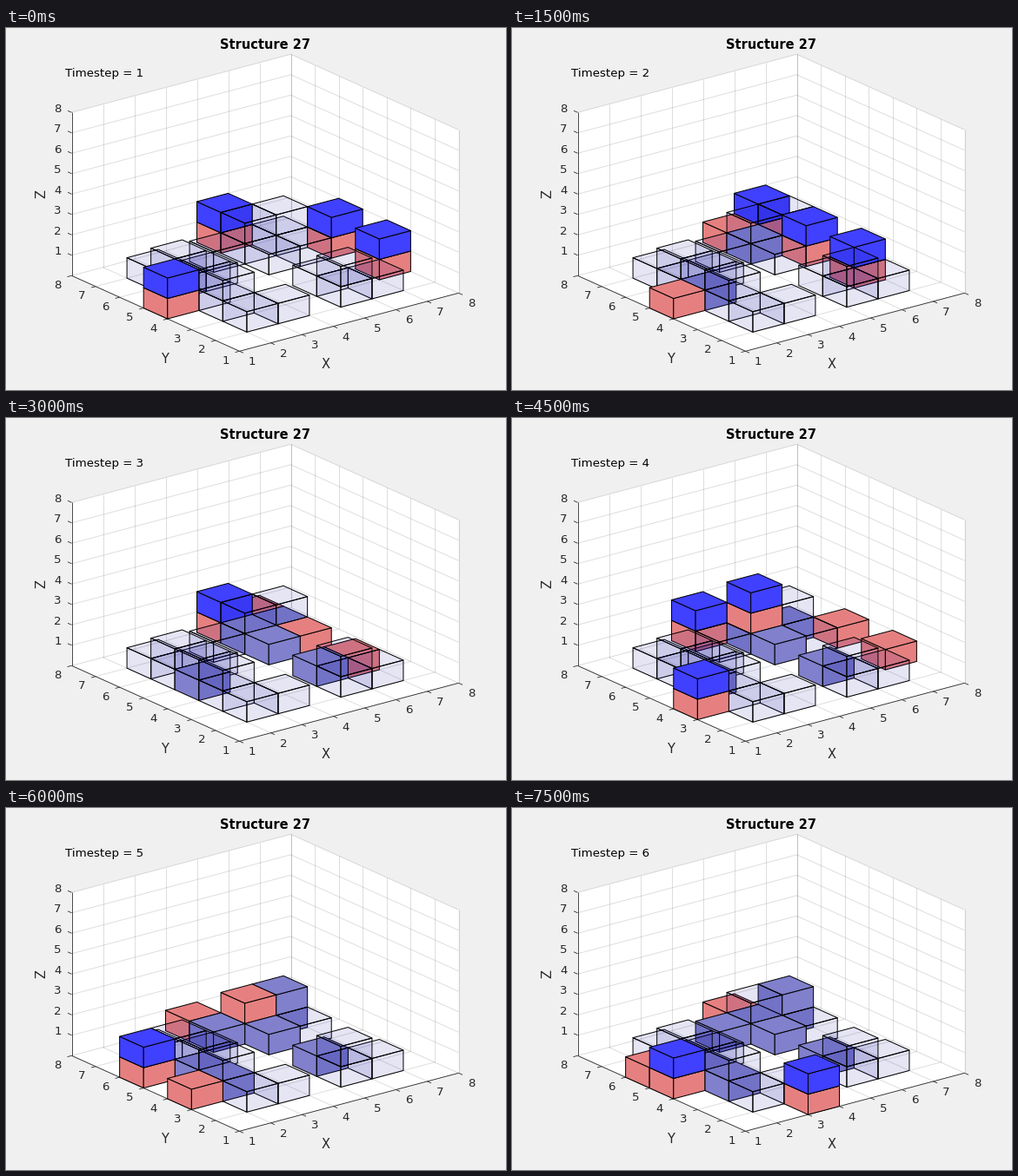
These frames come from a looping animation (575x417 px, 8000 ms). A matplotlib script:

```python
import matplotlib.pyplot as plt
from matplotlib.animation import FuncAnimation
from matplotlib.patches import Polygon

W, H, DPI = 575, 417, 100
PX = 72 / DPI
INK = "#262626"
HOLD = 3  # animation frames per timestep

plt.rcParams["font.family"] = "DejaVu Sans"
fig = plt.figure(figsize=(W / DPI, H / DPI), dpi=DPI, facecolor="#f0f0f0")
ax = fig.add_axes([0, 0, 1, 1])
ax.set(xlim=(0, W), ylim=(H, 0))
ax.axis("off")


def project(x, y, z):
    x, y = x - 1, y - 1
    return (268.5 + 36 * x - 27.57 * y,
            372.3 - 9.57 * x - 12.43 * y - 23.5 * z)


def line(a, b, color=INK, width=0.8, alpha=1):
    ax.plot(*zip(a, b), color=color, lw=width * PX, alpha=alpha,
            solid_capstyle="butt", zorder=1)


def label(x, y, text, size=13.33, color=INK, **kw):
    kw = {"ha": "center", "va": "center", **kw}
    return ax.text(x, y, text, fontsize=size * PX, color=color, **kw)


def draw_axes():
    floor = [(1, 1, 0), (8, 1, 0), (8, 8, 0), (1, 8, 0)]
    left = [(1, 8, 0), (8, 8, 0), (8, 8, 8), (1, 8, 8)]
    right = [(8, 1, 0), (8, 8, 0), (8, 8, 8), (8, 1, 8)]
    for wall in (floor, left, right):
        ax.add_patch(Polygon([project(*p) for p in wall], fc="w", lw=0, zorder=0))

    def grid(a, b):
        line(project(*a), project(*b), width=1, alpha=0.15)

    for n in range(1, 9):
        grid((n, 8, 0), (n, 8, 8))
        grid((8, n, 0), (8, n, 8))
        grid((1, 8, n), (8, 8, n))
        grid((8, 1, n), (8, 8, n))
        grid((n, 1, 0), (n, 8, 0))
        grid((1, n, 0), (8, n, 0))

        x, y = project(n, 1, 0)
        line((x, y), (x + 4.5, y + 2))
        label(x + 14.5, y + 12.5, n)
        x, y = project(1, n, 0)
        line((x, y), (x - 5, y + 1.3))
        label(x - 16, y + 11, n)
        x, y = project(1, 8, n)
        line((x, y), (x - 4.5, y - 2))
        label(x - 16, y - 4, n)

    corner = project(1, 1, 0)
    line(corner, project(8, 1, 0))
    line(corner, project(1, 8, 0))
    line(project(1, 8, 0), project(1, 8, 8))
    label(368, 387, "X", 14.67)
    label(182.5, 382, "Y", 14.67)
    label(41, 191, "Z", 14.67, rotation=90)
    label(298, 19, "Structure 27", 14.67, "k", weight="bold")


# Face colour and opacity of each kind of cube
PLAN = ((0, 0, 0.6), 0.1)
BUILT = ((0.5, 0.5, 0.8), 1)
ROBOT = ((0.9, 0.5, 0.5), 1)
CARGO = ((0.25, 0.25, 1), 1)

structure = [(2, y, 0) for y in range(2, 7)] + [(2, y, 1) for y in (3, 4, 5)]
structure += [(3, 2, 0), (3, 5, 0), (4, 6, 0)]
structure += [(x, y, 0) for x in (5, 6) for y in (5, 6)] + [(5, 6, 1), (6, 6, 1)]
structure += [(5, 2, 0), (5, 3, 0), (6, 2, 0), (5, 2, 1)]

# Per timestep: loaded robots, empty robots, newly placed blocks
steps = [
    ([(1, 4, 0), (5, 7, 0), (7, 5, 0), (7, 3, 0)], [], []),
    ([(6, 7, 0), (6, 5, 0), (6, 3, 0)], [(1, 4, 0), (5, 7, 0)],
     [(2, 4, 0), (5, 6, 0)]),
    ([(5, 7, 0)], [(6, 7, 0), (6, 5, 0), (6, 3, 0)],
     [(5, 5, 0), (6, 6, 0), (5, 3, 0)]),
    ([(4, 7, 0), (5, 6, 1), (1, 3, 0)], [(7, 5, 0), (7, 3, 0)], []),
    ([(1, 5, 0)], [(4, 7, 0), (5, 6, 1), (1, 3, 0)],
     [(2, 3, 0), (4, 6, 0), (6, 6, 1)]),
    ([(1, 4, 0), (3, 1, 0)], [(5, 7, 0), (1, 5, 0)], [(2, 5, 0)]),
]


def scene(step):
    cubes = {c: PLAN for c in structure}
    for _, _, placed in steps[:step + 1]:
        cubes.update({c: BUILT for c in placed})
    loaded, empty, _ = steps[step]
    cubes.update({c: ROBOT for c in loaded + empty})
    cubes.update({(x, y, z + 1): CARGO for x, y, z in loaded})
    # Far to near
    return sorted(cubes.items(), key=lambda c: (-c[0][0], -c[0][1], c[0][2]))


def faces(x, y, z):
    X, Y, Z = x + 1, y + 1, z + 1
    yield (x, y, z), (x, Y, z), (x, Y, Z), (x, y, Z)
    yield (x, y, z), (X, y, z), (X, y, Z), (x, y, Z)
    yield (x, y, Z), (X, y, Z), (X, Y, Z), (x, Y, Z)


draw_axes()
caption = label(68, 52.5, "", color="k", ha="left")
drawn = []


def update(frame):
    step = frame // HOLD
    while drawn:
        drawn.pop().remove()
    for cube, (color, alpha) in scene(step):
        for face in faces(*cube):
            patch = Polygon([project(*p) for p in face], fc=(*color, alpha),
                            ec="k", lw=PX, joinstyle="round",
                            zorder=2 + len(drawn) / 1000)
            drawn.append(ax.add_patch(patch))
    caption.set_text(f"Timestep = {step + 1}")
    return [*drawn, caption]


anim = FuncAnimation(fig, update, frames=16, interval=500, repeat=True,
                     repeat_delay=0, init_func=lambda: update(0))
plt.show()
```
